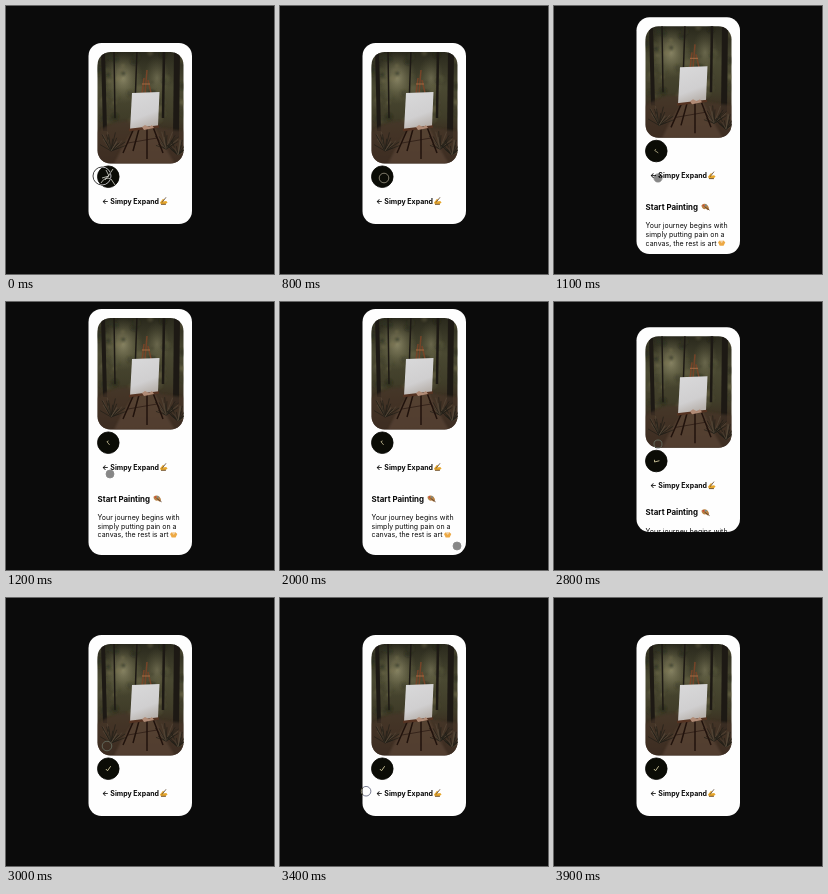
Recreate the animation shown at these times as an HTML page. Size 268 by 268 pixels, loop 4 s.

```html
<!DOCTYPE html>
<html lang="en">
<head>
<meta charset="utf-8">
<style>
  html, body { margin: 0; width: 100%; height: 100%; overflow: hidden; background: #0b0b0b; }
  svg { display: block; width: 100vw; height: 100vh; }
  text { font-family: Inter, "Open Sans", sans-serif; fill: #080808; }
  .label { font-size: 7px; font-weight: 700; }
  .title { font-size: 7.9px; font-weight: 700; }
  .copy { font-size: 7px; font-weight: 400; }
  #cursor { mix-blend-mode: difference; }
</style>
</head>
<body>
<svg viewBox="0 0 268 268">
  <defs>
    <clipPath id="cardClip"><rect id="clipRect" x="82.5" width="103.5" rx="13"/></clipPath>
    <clipPath id="photoClip"><rect x="91.5" y="46" width="86" height="111.5" rx="13"/></clipPath>
    <clipPath id="buttonClip"><circle cx="102.3" cy="170.7" r="11"/></clipPath>
    <linearGradient id="forest" x2="0" y2="1">
      <stop offset="0" stop-color="#29281c"/>
      <stop offset=".32" stop-color="#4a4932"/>
      <stop offset=".58" stop-color="#403d29"/>
      <stop offset=".74" stop-color="#3a2c20"/>
      <stop offset="1" stop-color="#281a14"/>
    </linearGradient>
    <radialGradient id="glow">
      <stop offset="0" stop-color="#a29d79" stop-opacity=".75"/>
      <stop offset="1" stop-color="#6e6b4a" stop-opacity="0"/>
    </radialGradient>
    <linearGradient id="paper" x2=".3" y2="1">
      <stop offset="0" stop-color="#d9d9da"/>
      <stop offset=".7" stop-color="#d0cfd0"/>
      <stop offset="1" stop-color="#b9b3ae"/>
    </linearGradient>
    <filter id="soft"><feGaussianBlur stdDeviation="1.3"/></filter>
  </defs>

  <rect id="card" x="82.5" width="103.5" rx="13" fill="#fefefe"/>
  <g clip-path="url(#cardClip)">
    <g id="content">
      <g clip-path="url(#photoClip)">
        <rect x="91" y="45" width="88" height="114" fill="url(#forest)"/>
        <ellipse cx="117" cy="72" rx="20" ry="26" fill="url(#glow)"/>
        <ellipse cx="151" cy="72" rx="13" ry="23" fill="url(#glow)" opacity=".55"/>
        <g id="leaves" filter="url(#soft)"></g>
        <g stroke="#1d1914" fill="none">
          <path d="M97 44L99 125" stroke-width="4"/>
          <path d="M108 44L109 112M131 44L129 100" stroke-width="1.5"/>
          <path d="M158 44L157 112" stroke-width="2.5"/>
          <path d="M171 44L170 132" stroke-width="6"/>
        </g>
        <path d="M91 126Q112 111 134 117T178 125V158H91Z" fill="#49372a" opacity=".65" filter="url(#soft)"/>
        <path d="M108 158Q120 132 130 122L149 122Q157 138 169 158Z" fill="#6a5242" opacity=".45" filter="url(#soft)"/>
        <g id="bushes" fill="none" stroke-width=".7"></g>
        <g fill="none" stroke="#20120c" stroke-width="1.5">
          <path d="M128 122L117 147M133 123L127 145M141 122V153M147 121L157 147"/>
          <path d="M122 137L151 132" stroke-width=".6"/>
        </g>
        <path d="M141 64L139 88M138 72L136 88M142 74L145 87" stroke="#764428" stroke-width="1.5"/>
        <path d="M136 78H144" stroke="#a46a43"/>
        <path d="M126 87L153.5 86L152 120L124 124Z" fill="url(#paper)"/>
        <path d="M123 124L153 120.5" stroke="#553322" stroke-width="2.4"/>
        <path d="M136 121l3-2 4 2 3-2 2 3-10 2z" fill="#b08b76"/>
      </g>

      <circle id="button" cx="102.3" cy="170.7" r="10.8" stroke="#080805" stroke-width=".8"/>
      <path id="tick" d="M-2.4 .3L-.8 2.1L2.4-2.5" fill="none" stroke="#d5cca0" stroke-width=".9"/>
      <g id="scribble" fill="none" stroke="#e9e9df" stroke-width=".75" clip-path="url(#buttonClip)">
        <path d="M95 177Q99 170 105 173L109 179M99 174L103 169L107 163M100 164L103 170L96 172"/>
      </g>

      <text class="label" x="96" y="198">← Simpy Expand</text>
      <g transform="translate(154 191.5)">
        <path d="M0 5L3 1.2L4 2L2.6 4L6.2 3.5L7.6 5L5 7H1Z" fill="#e7a72c"/>
        <path d="M2 5L6-.2M1 6.8H6" stroke="#58402b" stroke-width=".8"/>
      </g>

      <g id="details">
        <text class="title" x="91.6" y="225">Start Painting</text>
        <g transform="translate(147.5 218.3)">
          <path d="M0 2Q3-.8 6 2Q9 6 6 7Q4 5 3 6Q0 5 0 2Z" fill="#b98345"/>
          <circle cx="2" cy="2.3" r=".8" fill="#d33e38"/>
          <circle cx="4.4" cy="2.2" r=".8" fill="#4d8fb7"/>
          <path d="M3 3.5L8 7" stroke="#65462f"/>
        </g>
        <text class="copy" x="91.6" y="243.5">Your journey begins with</text>
        <text class="copy" x="91.6" y="252.2">simply putting pain on a</text>
        <text class="copy" x="91.6" y="260.9">canvas, the rest is art</text>
        <g transform="translate(164 254.5)">
          <path d="M0 3L2 1L3.5 3L5 1L7.3 3L5.6 6.5H1.7Z" fill="#eda944"/>
          <path d="M2.3 2.2Q3.7 0 5 2.2L3.7 4Z" fill="#f3d0a0"/>
        </g>
      </g>
    </g>
  </g>
  <circle id="cursor" stroke-width=".8"/>
</svg>

<script>
const LOOP = 4000;
const $ = id => document.getElementById(id);
const set = (id, attrs) => {
  for (const key in attrs) $(id).setAttribute(key, attrs[key]);
};
const clamp = x => Math.max(0, Math.min(1, x));
const mix = (a, b, p) => a + (b - a) * p;
const ramp = (t, from, to) => {
  const p = clamp((t - from) / (to - from));
  return p * p * (3 - 2 * p);
};

// time, x, y, radius
const path = [
  [0, 96, 170, 9], [200, 113, 181, 6], [450, 164, 193, 4.5],
  [700, 108, 177, 4.5], [800, 104, 172, 4.8], [1200, 104, 172, 4],
  [1500, 128, 192, 4], [1800, 165, 230, 4], [2000, 177, 244, 4],
  [2400, 104, 142, 4], [2800, 104, 142, 4], [3000, 101, 148, 4.8],
  [3250, 64, 172, 4.8], [3450, 90, 197, 4.8], [3700, 135, 170, 4.8]
];

function cursorAt(t) {
  let i = 0;
  while (i < path.length - 2 && t > path[i + 1][0]) i++;
  const a = path[i], b = path[i + 1];
  const p = ramp(t, a[0], b[0]);
  return [1, 2, 3].map(k => mix(a[k], b[k], p));
}

function growForest() {
  let seed = 17;
  const rand = () => (seed = seed * 16807 % 2147483647) / 2147483647;
  const tones = ["#1f2418", "#56553b", "#79734f", "#303322"];
  let leaves = "", bushes = "";
  for (let i = 0; i < 75; i++) {
    leaves += `<circle cx="${91 + rand() * 87}" cy="${46 + rand() * 72}" r="${1 + rand() * 3}"
      fill="${tones[i % 4]}" opacity="${.2 + rand() * .4}"/>`;
  }
  for (const [x, y] of [[105, 145], [160, 143], [172, 149]]) {
    for (let i = 0; i < 22; i++) {
      const a = Math.PI * (1.06 + rand() * .88), r = 8 + rand() * 12;
      bushes += `<path d="M${x} ${y}l${Math.cos(a) * r * .8} ${Math.sin(a) * r}"
        stroke="${i % 3 ? "#211f18" : "#554838"}"/>`;
    }
  }
  $("leaves").innerHTML = leaves;
  $("bushes").innerHTML = bushes;
}

function draw(t) {
  const open = ramp(t, 850, 1180) - ramp(t, 2600, 2950);
  const slack = 1 - ramp(t, 2430, 2550);
  const top = mix(37, 7, open);
  const box = { y: top, height: mix(218, 249 + 4 * slack, open) - top };
  set("card", box);
  set("clipRect", box);
  set("content", { transform: `translate(0 ${top - 37})` });
  set("details", { transform: `translate(0 ${4.5 * slack})` });

  const inverted = t >= 2450 && t < 2700;
  set("button", { fill: inverted ? "#fefefe" : "#0b0c06" });
  set("tick", {
    transform: `translate(102.3 170.7) rotate(${105 * open}) scale(${mix(1, .75, open)})`,
    opacity: inverted || t < 250 || (t > 650 && t < 950) ? 0 : 1
  });
  set("scribble", { opacity: 1 - ramp(t, 30, 200) });

  const [cx, cy, r] = cursorAt(t);
  const pressed = t >= 1000 && t < 2700;
  set("cursor", {
    cx, cy, r,
    fill: pressed ? "#777" : "none",
    stroke: pressed ? "#777" : t < 250 ? "#eee" : "#a9a58c",
    opacity: 1 - ramp(t, 3550, 3700)
  });
}

function tick() {
  draw(performance.now() % LOOP);
  requestAnimationFrame(tick);
}

growForest();
tick();
</script>
</body>
</html>
```
